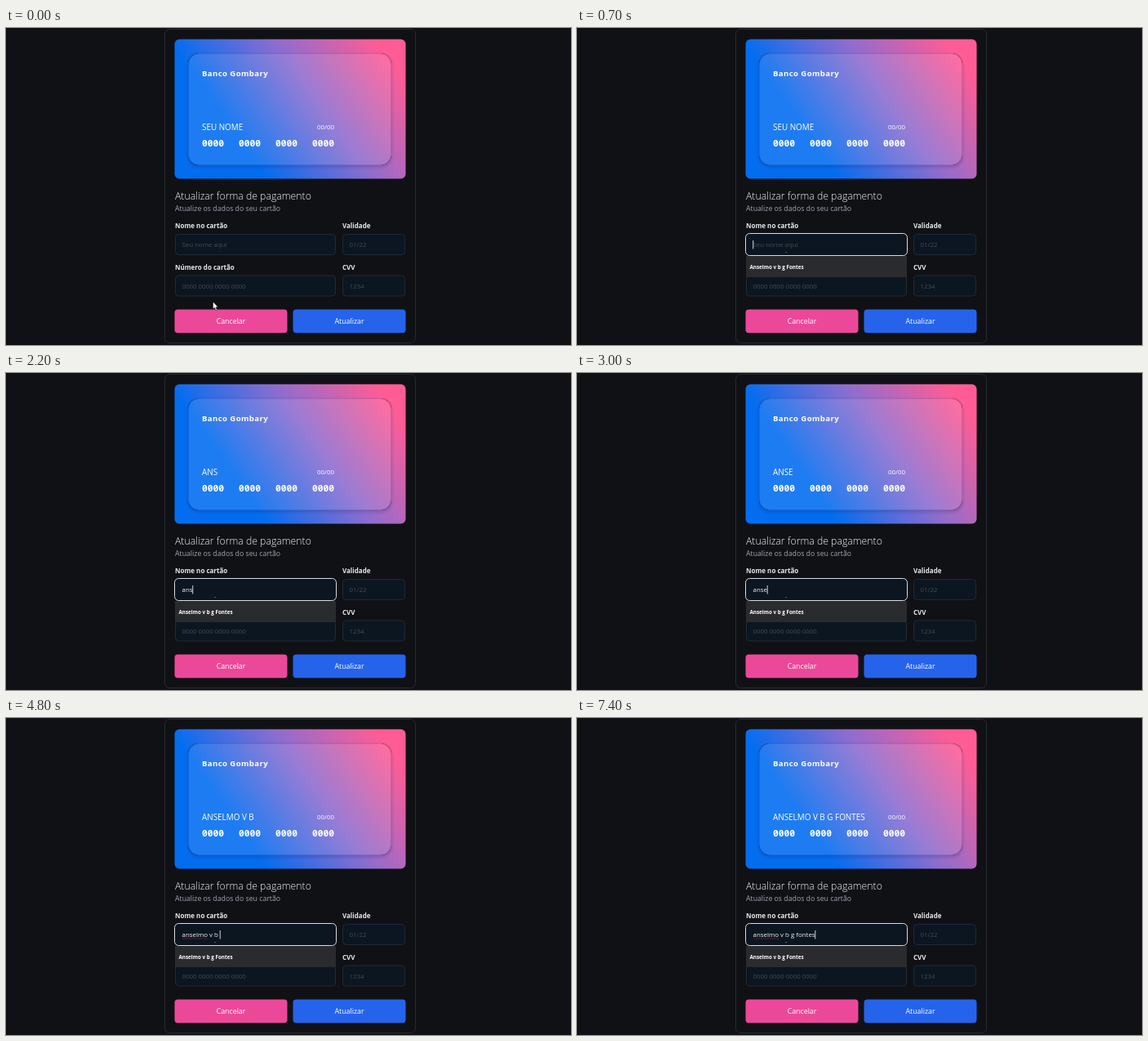
These frames come from a looping animation (692x388 px, 8 s). An HTML page with a canvas:

```html
<!DOCTYPE html>
<html lang="pt-BR">
<head>
<meta charset="utf-8">
<title>Atualizar forma de pagamento</title>
<style>
  html, body { margin: 0; width: 100%; height: 100%; overflow: hidden; background: #101115; }
  canvas { display: block; width: 692px; height: 388px; }
</style>
</head>
<body>
<canvas id="stage"></canvas>
<script>
const W = 692, H = 388, LOOP = 8000, STEP = 100;
const SANS = '"Open Sans", "Noto Sans", sans-serif';
const MONO = '"Noto Sans Mono", "DejaVu Sans Mono", monospace';
const OWNER = 'Anselmo v b g Fontes';
const TYPED = OWNER.toLowerCase();
const FOCUS_AT = 700, SPELL_AT = 3700;
// Time at which each character of the name is typed
const KEYS = [1700, 1900, 2100, 2600, 3100, 3300, 3500, 3700, 3900, 4200,
              4500, 4800, 5200, 5500, 5600, 5800, 6100, 6300, 7300, 7400];

const canvas = document.getElementById('stage');
const ctx = canvas.getContext('2d');
const dpr = window.devicePixelRatio || 1;
canvas.width = W * dpr;
canvas.height = H * dpr;

function box(x, y, w, h, r, fill, stroke, line = 1) {
  ctx.beginPath();
  ctx.roundRect(x, y, w, h, r);
  if (fill) { ctx.fillStyle = fill; ctx.fill(); }
  if (stroke) { ctx.strokeStyle = stroke; ctx.lineWidth = line; ctx.stroke(); }
}

function text(str, x, y, size, color, { weight = 400, family = SANS, align = 'left', spacing = 0 } = {}) {
  ctx.font = `${weight} ${size}px ${family}`;
  ctx.letterSpacing = spacing + 'px';
  ctx.textAlign = align;
  ctx.fillStyle = color;
  ctx.fillText(str, x, y);
}

function drawCard(name) {
  // Gradient axis runs from lower left to upper right
  const x0 = 200, y0 = 14, len = 205;
  const g = ctx.createLinearGradient(x0, y0, x0 + len * 0.82, y0 - len * 0.58);
  g.addColorStop(0, '#036df0');
  g.addColorStop(0.5, '#8c6dd0');
  g.addColorStop(1, '#ff5c95');
  box(206.5, 13.7, 283, 170.8, 6, g);

  ctx.save();
  ctx.beginPath();
  ctx.rect(207, 14, 282, 170);
  ctx.roundRect(223, 31, 249, 137, 13);
  ctx.clip('evenodd');
  ctx.shadowColor = 'rgba(10,20,70,0.25)';
  ctx.shadowBlur = 5 * dpr;
  ctx.shadowOffsetY = 2 * dpr;
  box(223, 31, 249, 137, 13, '#000');
  ctx.restore();
  box(223.5, 31.5, 248, 136, 13, 'rgba(255,255,255,0.1)', 'rgba(60,70,140,0.2)');

  text('Banco Gombary', 240, 58.9, 9.6, '#fff', { weight: 700, spacing: 0.4 });
  text(name, 240, 125, 9.9, '#fff', { weight: 500 });
  text('00/00', 381, 124, 7.9, '#fff', { weight: 500 });
  for (let i = 0; i < 4; i++)
    text('0000', 240 + 45 * i, 144.7, 11.3, '#fff', { weight: 600, family: MONO });
}

function drawField(label, hint, x, y, w) {
  text(label, x, y - 6.8, 8, '#e5e7eb', { weight: 700 });
  box(x + 0.5, y + 0.5, w - 1, 25, 4, '#0c1621', '#202a37');
  text(hint, x + 8.5, y + 16, 7.9, '#434b57');
}

function drawButton(label, x, color) {
  box(x - 0.5, 344.6, 138, 28.6, 4, color);
  text(label, x + 68.5, 362, 8.8, '#fff', { align: 'center' });
}

function drawFocus(t, typed) {
  box(206.5, 251.5, 198, 27, 5, '#0c1621', '#d9dbdf');
  if (typed) text(typed, 215.5, 268, 7.9, '#f3f4f6');
  else text('Seu nome aqui', 215.5, 268, 7.9, '#434b57');
  ctx.font = `400 7.9px ${SANS}`;
  ctx.letterSpacing = '0px';

  if (t >= SPELL_AT) {
    const end = 215.5 + ctx.measureText(TYPED.split(' ')[0]).width;
    ctx.beginPath();
    for (let x = 216; x <= end; x += 0.5) ctx.lineTo(x, 270 + 0.6 * Math.sin(x * 2));
    ctx.strokeStyle = 'rgba(215,50,75,0.6)';
    ctx.lineWidth = 0.7;
    ctx.stroke();
  }

  const last = Math.max(FOCUS_AT, ...KEYS.filter(k => k <= t));
  if (last === KEYS[KEYS.length - 1] || Math.floor((t - last) / 500) % 2 === 0) {
    ctx.fillStyle = '#e5e7eb';
    ctx.fillRect(215.3 + ctx.measureText(typed).width, 260, 0.9, 10.5);
  }

  box(207, 279, 197, 26, 0, '#2a2b2d');
  text(OWNER, 211.5, 294.5, 6.3, '#fff', { weight: 700 });
}

function drawPointer(t) {
  const p = Math.min(1, t / 500), e = p * p * (3 - 2 * p);
  const x = 253.5 + 3 * e, y = 335 - 65 * e;
  const overField = (y > 252 && y < 278) || (y > 303 && y < 328);
  if (overField) {
    ctx.fillStyle = 'rgba(10,16,24,0.5)';
    ctx.fillRect(x - 0.4, y - 5, 0.8, 9);
    ctx.fillStyle = '#8b929c';
    ctx.fillRect(x - 1, y + 4, 1.2, 1);
    return;
  }
  const shape = [[0, 0], [0, 9], [2, 7.2], [3.5, 10.4], [4.9, 9.8], [3.5, 6.7], [6.2, 6.5]];
  ctx.beginPath();
  for (const [dx, dy] of shape) ctx.lineTo(x + dx, y + dy);
  ctx.closePath();
  ctx.fillStyle = '#fff';
  ctx.fill();
  ctx.strokeStyle = '#000';
  ctx.lineWidth = 0.5;
  ctx.stroke();
}

function draw(t) {
  const typed = TYPED.slice(0, KEYS.filter(k => k <= t).length);
  ctx.setTransform(dpr, 0, 0, dpr, 0, 0);
  ctx.fillStyle = '#101115';
  ctx.fillRect(0, 0, W, H);
  box(194.5, 1.5, 307, 384, 6, null, '#292b33');

  drawCard(typed ? typed.toUpperCase() : 'SEU NOME');
  text('Atualizar forma de pagamento', 207, 210, 12.25, '#f3f4f6', { weight: 350 });
  text('Atualize os dados do seu cartão', 207, 223.5, 8.75, '#9ca3af');
  drawField('Nome no cartão', typed ? '' : 'Seu nome aqui', 207, 252, 197);
  drawField('Validade', '01/22', 412, 252, 77);
  drawField('Número do cartão', '0000 0000 0000 0000', 207, 302.5, 197);
  drawField('CVV', '1234', 412, 302.5, 77);
  drawButton('Cancelar', 207, '#ec4899');
  drawButton('Atualizar', 352, '#2563eb');
  if (t >= FOCUS_AT) drawFocus(t, typed);
  drawPointer(t);
}

const start = performance.now();
function tick() {
  const t = (performance.now() - start) % LOOP;
  draw(Math.floor(t / STEP) * STEP);
  requestAnimationFrame(tick);
}
tick();
</script>
</body>
</html>
```
